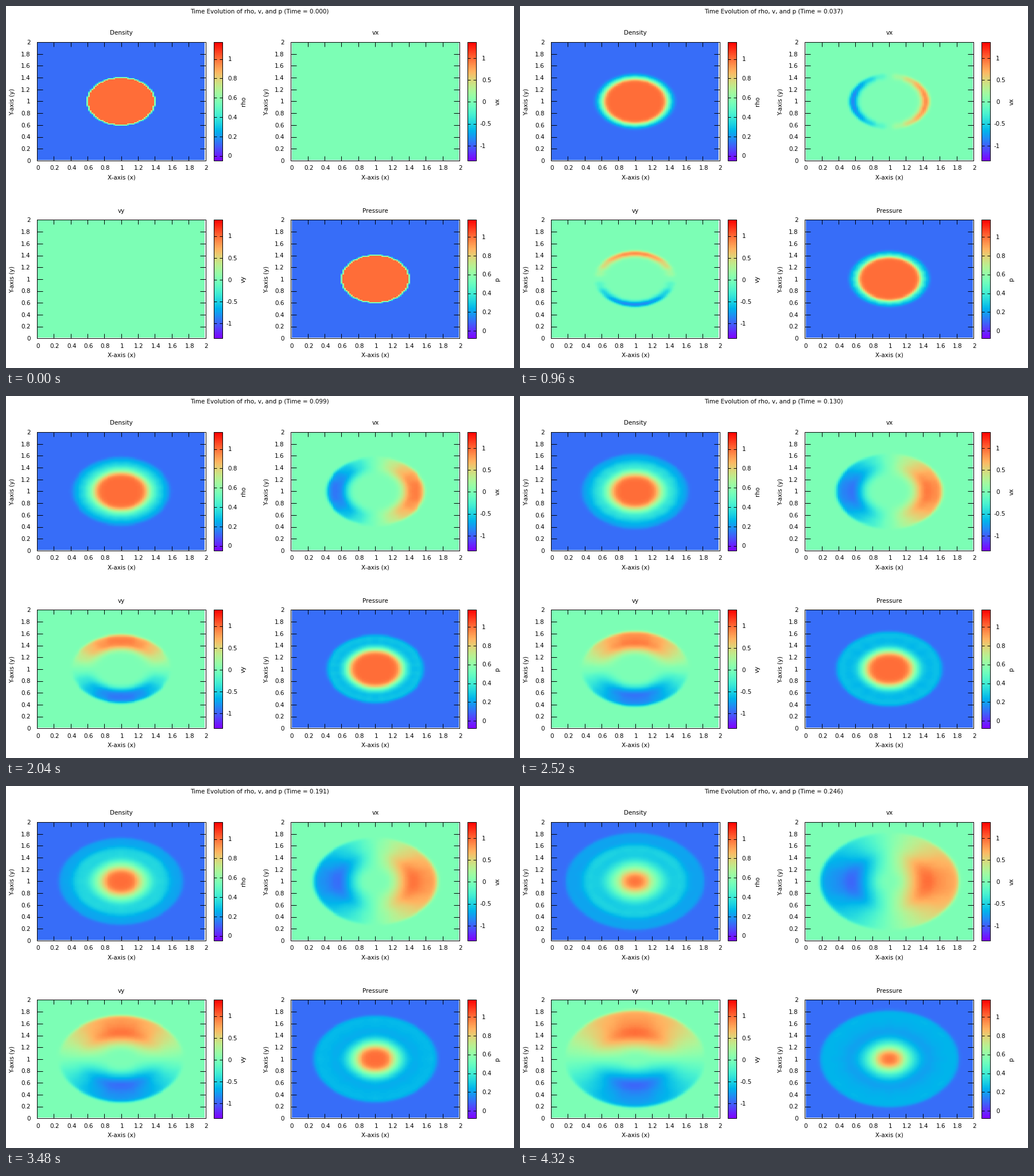
A matplotlib script for the animation above (4440 ms loop, 885 by 632 pixels).

```python
import numpy as np
import matplotlib.pyplot as plt
from matplotlib.animation import FuncAnimation
from matplotlib.colors import ListedColormap

W, H, DPI = 885, 632, 64
PX = 72 / DPI
FRAMES, INTERVAL = 37, 120
N, GAMMA = 100, 1.4
DX = 2 / N

plt.rcParams["font.family"] = "DejaVu Sans"
plt.rcParams["font.size"] = 10.43 * PX

# Simulated time at a few output steps; every fifth output is skipped.
STEPS = [0, 4, 10, 16, 21, 31, 36, 45]
TIMES = [0, 0.010, 0.037, 0.068, 0.099, 0.160, 0.191, 0.246]


def time_at(n):
    return float(np.interp(n * 5 // 4, STEPS, TIMES))


# ---- Euler equations: second-order scheme with Rusanov fluxes ----

def primitive(U):
    rho, mx, my, e = U
    u, v = mx / rho, my / rho
    return np.array([rho, u, v, (GAMMA - 1) * (e - 0.5 * rho * (u * u + v * v))])


def conserved(q):
    rho, u, v, p = q
    return np.array([rho, rho * u, rho * v,
                     p / (GAMMA - 1) + 0.5 * rho * (u * u + v * v)])


def flux(q, U):
    rho, u, v, p = q
    return np.array([U[1], U[1] * u + p, U[2] * u, (U[3] + p) * u])


def sound(q):
    return np.sqrt(GAMMA * q[3] / q[0])


def rate_x(U):
    q = primitive(U)
    back = q - np.roll(q, 1, -1)
    ahead = np.roll(q, -1, -1) - q
    slope = np.where(back * ahead > 0,
                     np.sign(back) * np.minimum(abs(back), abs(ahead)), 0)
    ql = q + slope / 2
    qr = np.roll(q - slope / 2, -1, -1)
    speed = np.maximum(abs(ql[1]) + sound(ql), abs(qr[1]) + sound(qr))
    Ul, Ur = conserved(ql), conserved(qr)
    F = (flux(ql, Ul) + flux(qr, Ur) - speed * (Ur - Ul)) / 2
    return (np.roll(F, 1, -1) - F) / DX


def turn(U):
    return U[[0, 2, 1, 3]].transpose(0, 2, 1)


def rate(U):
    return rate_x(U) + turn(rate_x(turn(U)))


def advance(U, span):
    while span > 1e-12:
        q = primitive(U)
        speed = (np.maximum(abs(q[1]), abs(q[2])) + sound(q)).max()
        dt = min(span, 0.4 * DX / speed)
        mid = U + dt * rate(U)
        U = 0.5 * (U + mid + dt * rate(mid))
        span -= dt
    return U


def simulate():
    c = (np.arange(N) + 0.5) * DX - 1
    x, y = np.meshgrid(c, c)
    inside = np.hypot(x, y) < 0.4
    zero = np.zeros((N, N))
    U = conserved([np.where(inside, 1, 0.125), zero, zero,
                   np.where(inside, 1, 0.1)])
    out, t = [], 0
    for n in range(FRAMES):
        U = advance(U, time_at(n) - t)
        t = time_at(n)
        q = primitive(U)
        # each drawn cell is the mean of its four corner values
        out.append((q[:, 1:, 1:] + q[:, 1:, :-1]
                    + q[:, :-1, 1:] + q[:, :-1, :-1]) / 4)
    return out


fields = simulate()

# ---- drawing in pixel coordinates ----

s = np.linspace(0, 1, 256)
RAINBOW = ListedColormap(np.clip(np.column_stack(
    [abs(2 * s - 0.5), np.sin(np.pi * s), np.cos(np.pi * s / 2)]), 0, 1))

fig = plt.figure(figsize=(W / DPI, H / DPI), dpi=DPI, facecolor="white")
ax = fig.add_axes([0, 0, 1, 1])
ax.axis("off")


def line(xs, ys):
    # whole numbers: snapping moves the stroke to the pixel's centre
    ax.plot(np.round(xs), np.round(ys), color="black", lw=PX,
            solid_capstyle="butt", snap=True, zorder=3)


def box(x0, y0, x1, y1):
    line([x0, x1, x1, x0, x0], [y0, y0, y1, y1, y0])


def label(x, y, text, ha="center"):
    return ax.text(x, y + 3.8, text, ha=ha, va="baseline")


def upright(x, y, text):
    ax.text(x, y, text, rotation=90, ha="center", va="center")


def image(data, extent, lo, hi):
    return ax.imshow(data, cmap=RAINBOW, vmin=lo, vmax=hi, extent=extent,
                     origin="lower", aspect="auto", interpolation="nearest",
                     zorder=1)


def panel(left, top, title, name, data, lo, hi, ticks):
    right, bottom = left + 293.5, top + 207
    sx, sy = 293.5 / 2, 207 / 2
    half = DX / 2
    img = image(data, (left + half * sx, right - half * sx,
                       bottom - half * sy, top + half * sy), lo, hi)
    box(left, top, right, bottom)
    for i in range(11):
        v = i / 5
        x, y = left + v * sx, bottom - v * sy
        line([x, x], [top, top + 8])
        line([x, x], [bottom - 8, bottom])
        line([left, left + 10], [y, y])
        line([right - 10, right], [y, y])
        label(x + 1.5, bottom + 12.5, f"{v:g}")
        label(left - 11.5, y, f"{v:g}", "right")
    label(left + 147, bottom + 28.5, "X-axis (x)")
    upright(left - 42.5, top + 104, "Y-axis (y)")
    label(left + 147, top - 16.5, title)

    b0, b1 = left + 308, left + 323
    image(s[:, None], (b0, b1, bottom, top), 0, 1)
    box(b0, top, b1, bottom)
    for v in ticks:
        y = bottom - (v - lo) / (hi - lo) * 207
        line([b0, b0 + 5], [y, y])
        line([b1 - 5, b1], [y, y])
        label(left + (329.5 if v < 0 else 332.5), y, f"{v:g}", "left")
    upright(left + 360, top + 103.5, name)
    return img


fifths = [i / 5 for i in range(6)]
halves = [-1, -0.5, 0, 0.5, 1]
first = fields[0]
images = [
    panel(54, 63, "Density", "rho", first[0], -0.05, 1.175, fifths),
    panel(496.4, 63, "vx", "vx", first[1], -1.342, 1.368, halves),
    panel(54, 373.4, "vy", "vy", first[2], -1.342, 1.368, halves),
    panel(496.4, 373.4, "Pressure", "p", first[3], -0.08, 1.18, fifths),
]
heading = label(442, 9.5, "")
ax.set(xlim=(0, W), ylim=(H, 0))


def draw(n):
    for img, data in zip(images, fields[n]):
        img.set_data(data)
    heading.set_text(f"Time Evolution of rho, v, and p (Time = {time_at(n):.3f})")
    return images + [heading]


anim = FuncAnimation(fig, draw, frames=FRAMES, interval=INTERVAL, repeat=True)
plt.show()
```
